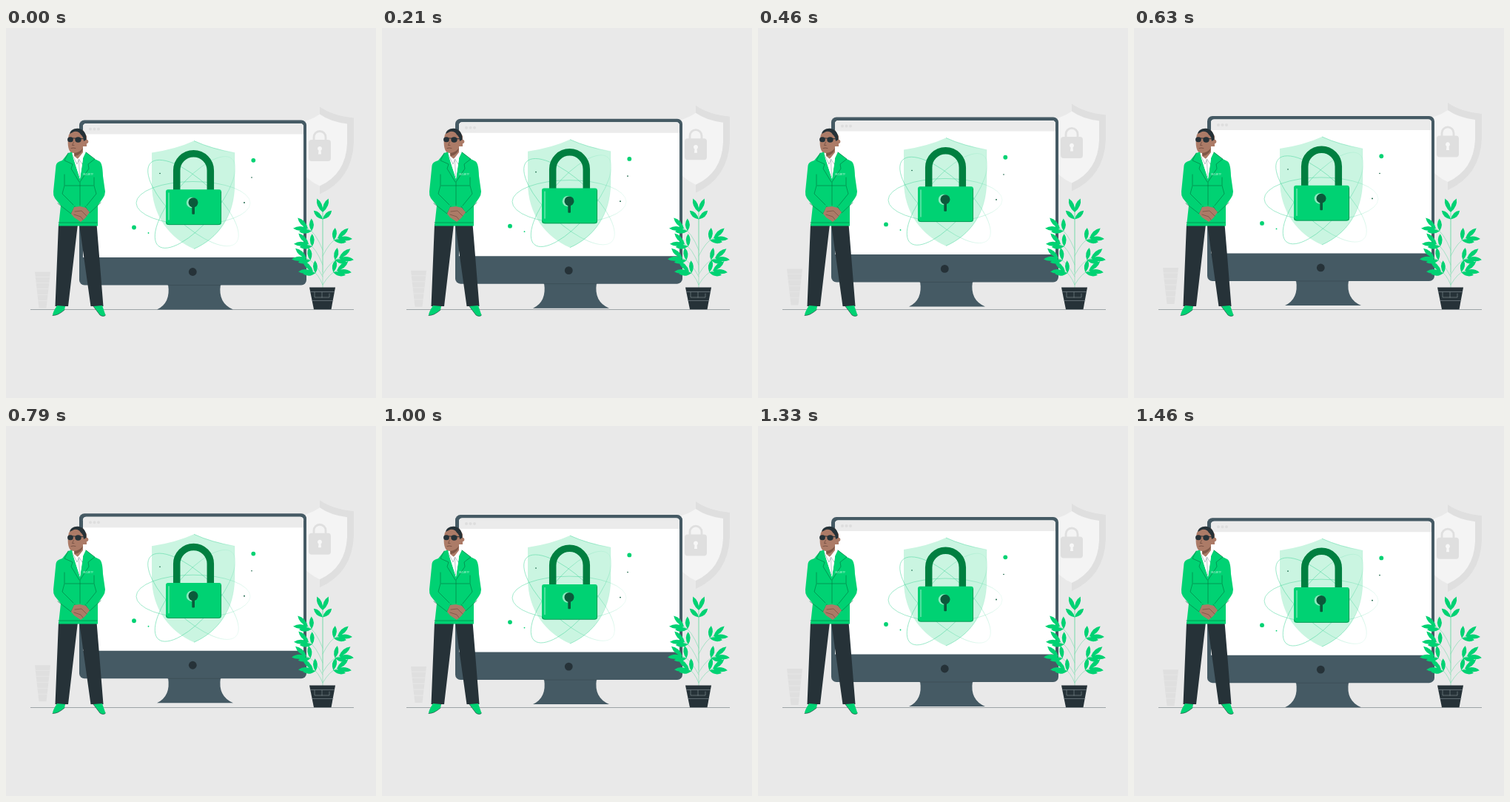
Recreate the animation shown at these times as an HTML page. Size 500 by 500 pixels, loop 1500 ms.

```html
<!DOCTYPE html>
<html lang="en">
<head>
<meta charset="utf-8">
<title>Security guard</title>
<style>
  html, body { margin: 0; width: 100%; height: 100%; overflow: hidden; background: #e9e9e9; }
  svg { display: block; width: 100%; height: 100%; }
  .dark { fill: #263238; }
  .slate { fill: #455a64; }
  .green { fill: #00d273; }
  .skin { fill: #ac7b67; }
  .grey { fill: #dfdfdf; }
  .keyhole { fill: #0b5a3b; }
  .line { fill: none; stroke-width: .6; stroke-linecap: round; }
  .fold { stroke: #06713f; }
</style>
</head>
<body>
<svg viewBox="0 0 500 500">
  <linearGradient id="fade">
    <stop stop-color="#55d9a3"/>
    <stop offset=".6" stop-color="#55d9a3"/>
    <stop offset="1" stop-color="#55d9a3" stop-opacity=".2"/>
  </linearGradient>

  <path d="M33 380.5H470" stroke="#8b9397" stroke-width=".8"/>

  <g id="floating">
    <!-- background shield -->
    <path class="grey" d="M424 106Q441 118 470 121V154Q468 204 424 224Z"/>
    <path fill="#f4f4f4" d="M424 116Q438 126 461 129V156Q459 197 424 213Q389 197 387 156V129Q410 126 424 116Z"/>
    <path fill="none" stroke="#dfdfdf" stroke-width="2.8" d="M416 152V147a8 8 0 0 1 16 0V152"/>
    <rect class="grey" x="409" y="150.500" width="30" height="29" rx="4"/>
    <path fill="#f7f7f7" d="M422.500 165a3 3 0 1 1 3 0L426 170H422Z"/>

    <!-- cup -->
    <path class="grey" d="M39 329H60L54.500 378H44.500Z"/>
    <path class="line" stroke="#e9e9e9" d="M40 336H59M41 344H58M42 352H57M43 360H57M43 368H56"/>

    <!-- monitor -->
    <path class="slate" d="M219 346Q223 371 204 380H307Q286 371 290 346Z"/>
    <rect class="slate" x="99" y="124" width="307" height="223" rx="7"/>
    <path class="line" stroke="#37474f" d="M219 347H290"/>
    <path fill="#fff" d="M104 309.500V133q0-4.500 4.500-4.500h289q4.500 0 4.500 4.500V309.500Z"/>
    <path fill="#ebebeb" d="M104 143V133q0-4.500 4.500-4.500h289q4.500 0 4.500 4.500V143Z"/>
    <path stroke="#dedede" stroke-width="4" stroke-linecap="round" stroke-dasharray="0 5.500" d="M114 136h11.100"/>
    <circle class="dark" cx="252.300" cy="329" r="5.400"/>

    <!-- shield and orbits -->
    <path fill="#caf5e1" d="M254 152Q230 163 197 168V210C197 254 222 284 254 298C286 284 309 254 309 210V168Q278 163 254 152Z"/>
    <g fill="none" stroke="url(#fade)" stroke-width=".55">
      <path d="M254 152Q278 163 309 168V210C309 254 286 284 254 298"/>
      <ellipse cx="253" cy="236" rx="77" ry="29"/>
      <ellipse cx="253" cy="236" rx="79" ry="30" transform="rotate(43 253 236)"/>
      <ellipse cx="255.500" cy="235" rx="77" ry="29" transform="rotate(-50 255.500 235)"/>
    </g>
    <g class="green">
      <circle cx="334.300" cy="178.300" r="2.900"/><circle cx="173" cy="269" r="2.900"/>
      <circle cx="192.500" cy="276.500" r=".9"/>
    </g>
    <g class="keyhole">
      <circle cx="332" cy="201.500" r=".8"/><circle cx="322" cy="235.500" r=".9"/><circle cx="208" cy="196" r=".8"/>
    </g>

    <!-- padlock -->
    <path fill="none" stroke="#007f40" stroke-width="9.500" d="M230.700 220V192a22.800 22.800 0 0 1 45.600 0V220"/>
    <rect class="green" x="216" y="217.800" width="75" height="47.700" rx="3"/>
    <path class="line fold" d="M216.500 262q.5 3.200 3.500 3.200h67q3.600 0 3.600-3.200V221"/>
    <path stroke="#b3f3d6" stroke-width=".9" d="M220 222V259"/>
    <circle fill="#8eeac0" cx="251" cy="235.500" r="7.200"/>
    <circle class="keyhole" cx="253" cy="235.300" r="6.500"/>
    <rect class="keyhole" x="251.300" y="236" width="3.700" height="15.200" rx="1"/>
  </g>

  <!-- guard: legs and shoes -->
  <path class="dark" d="M71 265H97L84 376H66.500ZM99 265H122.500L131.500 376H114.500Z"/>
  <path class="green" d="M69 375L80 376L79 381Q70 389 63 388.500Q63 384 69 375ZM118 376L130 375L134.500 388Q132 391 127 388Z"/>
  <path class="line dark" stroke="#263238" d="M63 388.500Q70 389 79 381M118 376L127 388Q132 391 134.500 388"/>

  <!-- head -->
  <path fill="#fff" d="M90 168L104 167L107 172L100 206L89 172Z"/>
  <path class="skin" d="M85 144C82.500 154 83.500 165 88 168.500L92 169V173L97 177L104 168V160H109V146L104 138H90Z"/>
  <path fill="#7f5747" d="M92 169Q100 168 104 162Q103 171 93 173Z"/>
  <circle class="skin" cx="108.500" cy="153.500" r="2.800"/>
  <path class="dark" d="M86 143C87 138 92 135 98 135.800C105 137 109 143 108.500 151L105 153Q105 147 101 144Q98 139 92 140Z"/>
  <path stroke="#263238" d="M84 148.500L108 150"/>
  <g class="dark"><ellipse cx="87" cy="150.800" rx="3.900" ry="3.500"/><ellipse cx="97.500" cy="151" rx="4.200" ry="3.700"/></g>
  <path class="line" stroke="#5c3d33" d="M91.500 154L89.500 158.500H92M88 162.500Q91 161.500 94 162.500"/>

  <!-- jacket -->
  <path class="green" d="M84 169L89 167.500L91 176L100 204L104 176L108 167.500L120 177L126 180Q130.500 182 131 200L134 221Q134 226 131 230L124 240L124 267.500H71L74 240L66 230Q63.500 226 64 221L67.500 186Q68 181 76 179Z"/>
  <path fill="#fff" d="M90 172L96.500 177L103 172L104 177L100 204Z"/>
  <path class="line" stroke="#8a9aa0" d="M90 172L96 184L98.500 177L103 184M98.500 179L99.500 201"/>
  <path class="line fold" d="M84 169L79 179L90 184L88 190L99 208M108 168L120 177L111 184L112 190L100 208V240M79 198V213L76 224L91 239M119 202V213L122 224L109 240M80 213H118M71 263H123M93 241L88 251L70 237M107 241L113 250L128 236"/>
  <path class="skin" d="M92 242L100 241L108 243L113 249L107 257L101 262L92 256L88 251Z"/>
  <path class="line" stroke="#694638" d="M93 248L102 247L109 254M92 252L101 255L104 259"/>
  <text x="104" y="199" font-family="Inter, sans-serif" font-size="2.800" fill="#e8fff4">SECURITY</text>

  <!-- plant -->
  <path class="line" stroke="#7adcae" d="M428 351V249"/>
  <path id="twigs" class="line" stroke="#7adcae"/>
  <path id="leaves" class="green"/>
  <path class="dark" d="M410 350.500H445L439.500 380.300H416Z"/>
  <path class="line" stroke="#899499" d="M411 356.500H444M413.500 368.500H442M417 357V364H437V359M427 357V364"/>
</svg>

<script>
  const $ = id => document.getElementById(id);
  const STEM_X = 428;

  // Each twig: height on the stem, then its end point
  const twigs = [
    [330, 428, 249],
    [300, 408, 271], [320, 409, 292], [336, 406, 311], [347, 415, 329],
    [308, 448, 284], [333, 450, 311], [347, 447, 328]
  ];

  function leaf(x, y, angle, length) {
    const point = (along, across) =>
      `${x + along * Math.cos(angle) - across * Math.sin(angle)} ` +
      `${y + along * Math.sin(angle) + across * Math.cos(angle)}`;
    const tip = point(length, 0), middle = length * .55;
    return `M${x} ${y}Q${point(middle, 6)} ${tip}Q${point(middle, -6)} ${x} ${y}Z`;
  }

  // A twig is a quadratic curve with one pair of leaves at its end and one further down
  function growTwig([y0, x2, y2]) {
    const x1 = (STEM_X + x2) / 2, y1 = y0 + (y2 - y0) * .85;
    const mix = (a, b, t) => a + (b - a) * t;
    const pair = (t, spread, length) => {
      const ax = mix(STEM_X, x1, t), ay = mix(y0, y1, t);
      const bx = mix(x1, x2, t), by = mix(y1, y2, t);
      const heading = Math.atan2(by - ay, bx - ax);
      return [-spread, spread].map(turn =>
        leaf(mix(ax, bx, t), mix(ay, by, t), heading + turn, length)).join("");
    };
    return {
      line: `M${STEM_X} ${y0}Q${x1} ${y1} ${x2} ${y2}`,
      leaves: pair(1, .4, 20) + pair(.75, .8, 17)
    };
  }

  const grown = twigs.map(growTwig);
  $("twigs").setAttribute("d", grown.map(twig => twig.line).join(""));
  $("leaves").setAttribute("d", grown.map(twig => twig.leaves).join(""));

  const LOOP = 1500, LIFT = 6.6, REST = .5;

  function draw() {
    const phase = performance.now() % LOOP / LOOP;
    const lift = LIFT * (1 - Math.abs(1 - 2 * phase));
    $("floating").setAttribute("transform", `translate(0 ${REST - lift})`);
    requestAnimationFrame(draw);
  }
  draw();
</script>
</body>
</html>
```
